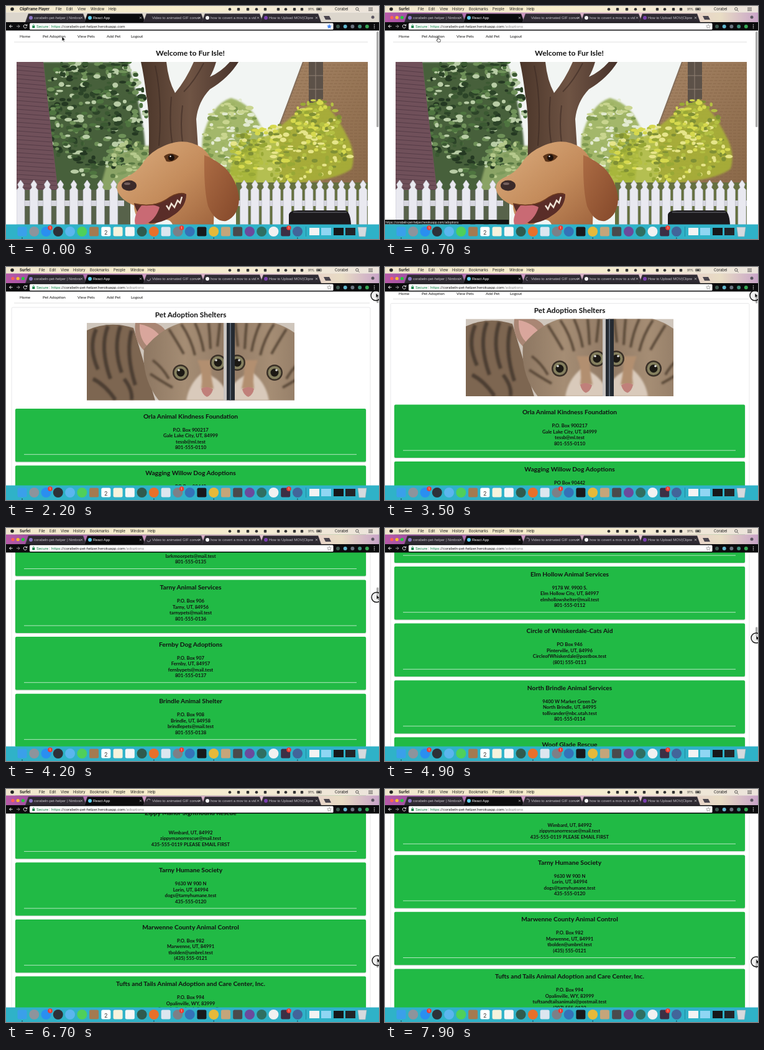
An HTML page that plays this animation: 600x375 px, repeating every 8000 ms.

```html
<!DOCTYPE html>
<html lang="en">
<head>
<meta charset="utf-8">
<title>Pet helper walkthrough</title>
<style>
  html, body { margin: 0; width: 100%; height: 100%; overflow: hidden; background: #fff; }
  svg { display: block; width: 100vw; height: 100vh; }
  text { white-space: pre; }
  .page text { font-family: Lato, "Open Sans", sans-serif; fill: #111; }
  .page .bold { font-weight: 700; text-anchor: middle; }
  .menu { font: 5.8px Inter, Roboto, sans-serif; fill: #1a1a1a; }
  .tab { font: 5.9px "Liberation Sans", Arial, sans-serif; fill: #c9c6cc; }
  .url { font: 6.25px Roboto, sans-serif; fill: #222; }
  .badge { font: 5px Roboto, sans-serif; fill: #fff; text-anchor: middle; }
</style>
</head>
<body>
<svg viewBox="0 0 600 375" preserveAspectRatio="none">
  <defs>
    <clipPath id="dogClip"><path d="M17 90H582V352H17z"/></clipPath>
    <clipPath id="catClip"><path d="M130 90H464V214.500H130z"/></clipPath>
    <linearGradient id="bar">
      <stop offset="0" stop-color="#f0e6cf"/><stop offset=".45" stop-color="#f8eecb"/><stop offset="1" stop-color="#ece4dc"/>
    </linearGradient>
    <linearGradient id="strip">
      <stop offset="0" stop-color="#b75aa8"/><stop offset=".08" stop-color="#9a4fa0"/><stop offset=".4" stop-color="#cf9fc0"/>
      <stop offset=".75" stop-color="#e6c9cf"/><stop offset=".9" stop-color="#e8dcc4"/><stop offset="1" stop-color="#c9a4c8"/>
    </linearGradient>
    <linearGradient id="fur" x1="0" y1="0" x2="1" y2="1">
      <stop offset="0" stop-color="#dcae80"/><stop offset=".55" stop-color="#c48c5c"/><stop offset="1" stop-color="#a0653e"/>
    </linearGradient>
    <linearGradient id="ear" x1="0" y1="0" x2="1" y2="1">
      <stop offset="0" stop-color="#ac6c44"/><stop offset="1" stop-color="#84482a"/>
    </linearGradient>
    <linearGradient id="bark">
      <stop offset="0" stop-color="#4a3529"/><stop offset=".5" stop-color="#6f5444"/><stop offset="1" stop-color="#47322a"/>
    </linearGradient>
    <linearGradient id="brick" x1="0" y1="0" x2="1" y2="1">
      <stop offset="0" stop-color="#a58465"/><stop offset="1" stop-color="#8a6848"/>
    </linearGradient>
    <linearGradient id="tabby">
      <stop offset="0" stop-color="#8d7762"/><stop offset=".5" stop-color="#a58d74"/><stop offset="1" stop-color="#927b66"/>
    </linearGradient>
    <filter id="soft"><feGaussianBlur stdDeviation="1.4"/></filter>
  </defs>

  <rect width="600" height="375" fill="#fff"/>

  <g id="home" class="page">
    <path d="M13 58H582" stroke="#d8d8d8" stroke-width=".8"/>
    <text class="bold" x="296.500" y="80.300" font-size="12.200">Welcome to Fur Isle!</text>
    <g clip-path="url(#dogClip)">
      <rect x="17" y="90" width="565" height="262" fill="#f2f5f3"/>
      <g filter="url(#soft)">
        <path d="M58 90H196L212 150L222 205L230 300H80z" fill="#46603a"/>
        <path d="M170 225H232V300H150z" fill="#8aa365"/>
        <path d="M316 212Q330 158 362 148Q398 158 412 200L400 300H312z" fill="#a3b76a"/>
      </g>
      <g id="leavesBack"></g>
      <path d="M17 90H60L84 300L17 318z" fill="#70505a"/>
      <path id="siding" stroke="#563c47" stroke-width="1.200" fill="none"/>
      <path d="M217 90H258Q261 120 272 140Q290 118 302 90H338Q334 104 328 114Q346 106 360 90H374Q358 116 328 134Q309 154 306 182L311 260H229Q232 178 226 146Q222 112 217 90z" fill="url(#bark)"/>
      <path d="M240 96Q252 150 246 225M266 146Q262 190 268 225M286 138Q304 120 318 92M284 160Q280 190 284 220" stroke="#3d2a23" stroke-width="2" fill="none" opacity=".6"/>
      <path d="M478 90H582V300H440V190z" fill="url(#brick)"/>
      <path id="courses" stroke="#7c5c40" stroke-width="1" stroke-dasharray="5 2" opacity=".55" fill="none"/>
      <path d="M478 90L440 192" stroke="#846e5b" stroke-width="2"/>
      <path d="M487 90H510V150L487 158z" fill="#5c5148"/>
      <path d="M498 90V154M487 112H510M487 134H510" stroke="#8f8072" stroke-width="1"/>
      <path d="M360 262Q372 224 430 204Q470 166 506 150Q530 172 548 208Q564 236 556 262Q520 290 360 290z" fill="#aab634" opacity=".85" filter="url(#soft)"/>
      <g id="leavesFront"></g>
      <path d="M30 296H200V352H30z" fill="#57624a"/>
      <path d="M370 284H582V352H370z" fill="#65703f"/>
      <g id="fence" fill="#e9e9f0"></g>
      <path d="M455 352V336Q456 329 470 329H545Q554 330 555 352z" fill="#1c1a1d"/>
      <path d="M462 332H548" stroke="#55555c" stroke-width="1.500"/>
      <path d="M262 222Q290 212 315 228Q342 250 336 290L334 352H268Q262 336 238 352H222Q206 340 206 321Q184 312 179 297Q176 284 190 277Q212 268 221 251Q234 232 262 222z" fill="url(#fur)"/>
      <path d="M206 318Q236 324 257 312Q280 296 290 303Q290 322 272 335Q252 350 232 350Q214 345 206 318z" fill="#5a2d28"/>
      <path d="M218 321Q238 318 247 324Q240 346 222 352H208Q204 338 218 321z" fill="#c96a74"/>
      <path d="M258 321L262 327L266 318L271 324L276 313L280 317L283 307" stroke="#efe4d6" stroke-width="2.500" fill="none"/>
      <path d="M206 318Q236 325 257 312Q276 298 288 303" stroke="#6d3a1e" stroke-width="1.500" fill="none"/>
      <path d="M319 240Q336 246 354 262Q373 284 375 310Q374 338 354 346Q336 348 325 322Q318 296 319 240z" fill="url(#ear)"/>
      <ellipse cx="198" cy="289" rx="12" ry="8.500" fill="#3b2a2a"/>
      <ellipse cx="195" cy="286" rx="5" ry="2" fill="#75605f"/>
      <path d="M254 242Q264 233 278 242Q270 253 258 250z" fill="#593319"/>
      <circle cx="266" cy="244" r="5" fill="#1d110c"/>
      <circle cx="264.500" cy="242" r="1.200" fill="#eee"/>
    </g>
  </g>

  <g id="shelters" class="page">
    <path d="M13 58H585" stroke="#d8d8d8" stroke-width=".8"/>
    <rect x="9" y="65" width="577" height="4100" rx="2" fill="#fff" stroke="#e2e2e4" stroke-width=".8"/>
    <text class="bold" x="297" y="80.800" font-size="11.800">Pet Adoption Shelters</text>
    <g clip-path="url(#catClip)">
      <rect x="130" y="90" width="334" height="125" fill="#cfc6bc"/>
      <path d="M130 102Q165 86 205 98L240 215H130z" fill="#7d6651"/>
      <path d="M145 100Q132 130 148 165M164 95Q150 130 168 180M184 95Q172 130 186 170M202 102Q192 140 208 190M140 180Q160 190 176 214M190 180Q204 198 202 214" stroke="#4c3d31" stroke-width="6" fill="none" filter="url(#soft)"/>
      <path d="M208 90H240Q258 96 262 116L226 138Q204 120 208 90z" fill="#a98674"/>
      <path d="M215 92Q238 96 250 114L228 128Q214 116 215 92z" fill="#d9a69c"/>
      <g id="face">
        <path d="M222 132Q250 96 290 88H354V215H246Q218 180 222 132z" fill="url(#tabby)"/>
        <path d="M262 100Q276 122 286 140M282 92Q298 116 304 142M304 90Q314 112 318 136M326 90Q328 110 329 132M344 90Q342 110 340 128M236 150Q252 162 262 180M232 172Q250 184 268 194" stroke="#5a4839" stroke-width="4" fill="none" filter="url(#soft)"/>
        <path d="M290 215Q294 188 316 170Q340 176 352 196V215z" fill="#d9cabb" filter="url(#soft)"/>
        <path d="M308 150Q318 172 314 196H334Q328 170 330 150z" fill="#b28f70" filter="url(#soft)"/>
        <path d="M314 196Q323 190 333 197Q330 207 323 209Q316 206 314 196z" fill="#c0807a"/>
        <g id="eyeL">
          <circle cx="281" cy="170" r="13" fill="#3a3027"/>
          <circle cx="281" cy="170" r="10.500" fill="#85805f"/>
          <circle cx="281" cy="170" r="6.500" fill="#1c1914"/>
          <circle cx="278" cy="166" r="1.800" fill="#ddd"/>
        </g>
        <use href="#eyeL" transform="translate(60 -16)"/>
      </g>
      <use href="#face" transform="translate(713 0) scale(-1 1)"/>
      <path d="M354 90H368V215H354z" fill="#252a31"/>
      <path d="M350 90H355V215H350z" fill="#c9c5c2"/>
      <path d="M361 90V215" stroke="#586270" stroke-width="2"/>
    </g>
    <g id="cards"></g>
  </g>

  <rect id="thumb" x="596" width="3.200" rx="1.600" fill="#a8a8a8"/>

  <g id="status">
    <rect y="344" width="199" height="7.500" fill="#111"/>
    <text x="1" y="349.500" style="font:4.950px Roboto,sans-serif" fill="#eee">https://corabeln-pet-helper.herokuapp.com/adoptions</text>
  </g>

  <g id="browser">
    <rect width="600" height="10.500" fill="url(#bar)"/>
    <circle cx="10" cy="5" r="2.800" fill="#222"/>
    <g id="menuPlayer" class="menu"></g>
    <g id="menuBrowser" class="menu"></g>
    <g id="tray" fill="#333"></g>
    <text class="menu" x="486" y="7" style="font-size:5px">91%</text>
    <rect x="499.500" y="3" width="8" height="4" rx=".8" fill="none" stroke="#333" stroke-width=".7"/>
    <rect x="500.500" y="4" width="5.500" height="2" fill="#333"/>
    <text class="menu" x="529" y="7.300">Corabel</text>
    <path d="M566.500 6.500L568.500 8.500M583 3H590M583 5.200H590M583 7.400H590" stroke="#333" stroke-width=".8"/>
    <circle cx="564.800" cy="4.700" r="2.200" fill="none" stroke="#333" stroke-width=".8"/>
    <rect y="10.500" width="600" height="16" fill="#dcd6cc"/>
    <rect id="stripFront" y="10.500" width="600" height="16" fill="url(#strip)"/>
    <g id="tabs"></g>
    <g id="lights"></g>
    <path id="spinner" d="M0 -2.800A2.800 2.800 0 0 1 0 2.800" fill="none" stroke="#8f8b96" stroke-width="1"/>
    <rect y="26" width="600" height="13.500" fill="#0b0b0d"/>
    <path d="M10.500 32.700H5.500L8 30.200M5.500 32.700L8 35.200" stroke="#eee" fill="none"/>
    <path d="M17 32.700H22L19.500 30.200M22 32.700L19.500 35.200" stroke="#999" fill="none"/>
    <path d="M33 31A2.700 2.700 0 1 0 33.500 33.500M33.800 29.500V31.700H31.600" stroke="#eee" fill="none"/>
    <rect x="38" y="27.500" width="488.500" height="10.500" rx="1.500" fill="#fff"/>
    <rect x="42.300" y="32" width="4" height="3.400" fill="#0b8043"/>
    <path d="M43.200 32V31A1.100 1.100 0 0 1 45.400 31V32" stroke="#0b8043" stroke-width=".7" fill="none"/>
    <text class="url" x="49" y="34.900" style="fill:#0b8043">Secure</text>
    <path d="M70 29.500V36" stroke="#ccc" stroke-width=".6"/>
    <text class="url" x="73" y="34.900"><tspan fill="#0b8043">https</tspan>://corabeln-pet-helper.herokuapp.com<tspan id="path" fill="#888">/adoptions</tspan></text>
    <path id="star" d="M520 29.500L521 31.800L523.400 32L521.600 33.600L522.200 36L520 34.700L517.800 36L518.400 33.600L516.600 32L519 31.800z" stroke-width=".6"/>
    <g id="extras"></g>
    <path d="M592.500 29.500V36.500" stroke="#ddd" stroke-width="1.300" stroke-dasharray="1.300"/>
  </g>

  <g id="dock"><rect y="351.500" width="600" height="24" fill="#2fb2c8"/></g>

  <g id="cursor">
    <circle id="press" cx="0" cy="4" r="8" fill="#ddd" fill-opacity=".45" stroke="#111" stroke-width="1.400"/>
    <path id="arrow" d="M0 0V7.500L1.800 5.900L3 8.700L4.200 8.200L3 5.500H5.400z" fill="#111" stroke="#fff" stroke-width=".6"/>
    <path id="hand" d="M-.6 0Q.6 -.8 1.100 .4V3L3.600 3.600Q4.600 4 4.300 5.500L3.600 8H0L-2.400 5Q-2.200 4 -.6 4.800z" fill="#fff" stroke="#111" stroke-width=".7"/>
  </g>
</svg>

<script>
const NS = "http://www.w3.org/2000/svg";
const $ = id => document.getElementById(id);

function add(parent, tag, attrs, text) {
  const el = document.createElementNS(NS, tag);
  for (const k in attrs) el.setAttribute(k, attrs[k]);
  if (text !== undefined) el.textContent = text;
  parent.append(el);
  return el;
}

let seed = 7;
const rnd = () => (seed = seed * 16807 % 2147483647) / 2147483647;

// Foliage: random leaf clumps inside an ellipse
function leaves(parent, n, cx, cy, rx, ry, size, colors) {
  for (let i = 0; i < n; i++) {
    const a = rnd() * 6.283, d = Math.sqrt(rnd());
    add(parent, "ellipse", {
      cx: cx + Math.cos(a) * d * rx, cy: cy + Math.sin(a) * d * ry,
      rx: size * (.5 + rnd()), ry: size * (.35 + rnd() * .6),
      fill: colors[Math.floor(rnd() * colors.length)]
    });
  }
}
const dark = ["#2c4428", "#3b5932", "#4f7540", "#243822", "#6f9159", "#b9cda6"];
const light = ["#b4c043", "#98a836", "#d6d94e", "#7f8f35", "#e6e58a"];
const pale = ["#9fb465", "#7f9a50", "#c9d58f", "#e2ead0"];
leaves($("leavesBack"), 420, 142, 170, 84, 105, 4.5, dark);
leaves($("leavesBack"), 60, 200, 255, 34, 40, 4, ["#7d9a5c", "#b5c98c", "#5b7a44"]);
leaves($("leavesBack"), 170, 364, 220, 48, 72, 4.5, pale);
leaves($("leavesFront"), 240, 455, 235, 100, 46, 4, light);
leaves($("leavesFront"), 90, 500, 182, 38, 32, 4, light);

let boards = "", courses = "";
for (let y = 96; y < 310; y += 7) boards += `M17 ${y}L${60 + (y - 90) * .11} ${y + 4}`;
for (let y = 95; y < 290; y += 5) courses += `M${Math.max(441, 478 - (y - 90) * .38)} ${y}H582`;
$("siding").setAttribute("d", boards);
$("courses").setAttribute("d", courses);

function fence(from, to, step) {
  add($("fence"), "path", { d: `M${from - 10} 313H${to + 10}v9H${from - 10}z`, fill: "#d6d6de" });
  for (let x = from; x <= to; x += step)
    add($("fence"), "path", {
      d: `M${x} 280l5 7l-2 5l3.500 4V352h-13V296l3.500 -4l-2 -5z`, stroke: "#b3b4c0", "stroke-width": .6
    });
}
fence(23.5, 180, 21.4);
fence(383, 580, 17.4);

for (const id of ["home", "shelters"])
  [["Home", 22], ["Pet Adoption", 59], ["View Pets", 115], ["Add Pet", 162], ["Logout", 201]]
    .forEach(([s, x]) => add($(id), "text", { x, y: 51.2, "font-size": 6.4 }, s));

const known = {
  0: ["Orla Animal Kindness Foundation", "P.O. Box 900217", "Gale Lake City, UT, 84999", "tessb@ml.test", "801-555-0110"],
  1: ["Wagging Willow Dog Adoptions", "PO Box 90442", "Gale Lake City, UT, 84998", "wagging@mail.test", "801-555-0111"],
  15: ["Elm Hollow Animal Services", "9178 W. 9900 S.", "Elm Hollow City, UT, 84997", "elmhollowshelter@mail.test", "801-555-0112"],
  16: ["Circle of Whiskerdale-Cats Aid", "PO Box 946", "Pinterville, UT, 84996", "CircleofWhiskerdale@postbox.test", "(801) 555-0113"],
  17: ["North Brindle Animal Services", "9400 W Market Green Dr", "North Brindle, UT, 84995", "tollivander@nbc.utah.test", "801-555-0114"],
  18: ["Woof Glade Rescue", "PO Box 958", "Pinterville, UT, 84996", "woofglade@mail.test", "801-555-0115"],
  28: ["Fernby Pet Adoptions", "PO Box 963", "Lorin, UT, 84994", "1adoptions@pmail.test", "(801) 555-0116"],
  29: ["Odem Hollow Animal Rescue, Inc.", "", "Quillen Fork, UT, 84993", "odemhollowanimalrescue@mail.test", "385-555-0117"],
  30: ["7 Snouts Rescue", "P.O. Box 971", "Wimbard, UT, 84992", "Snoutly42@pml.test", "801-555-0118"],
  31: ["Zippy Manor Sighthound Rescue", "", "Wimbard, UT, 84992", "zippymanorrescue@mail.test", "435-555-0119 PLEASE EMAIL FIRST"],
  32: ["Tarny Humane Society", "9630 W 900 N", "Lorin, UT, 84994", "dogs@tarnyhumane.test", "435-555-0120"],
  33: ["Marwenne County Animal Control", "P.O. Box 982", "Marwenne, UT, 84991", "tbolden@umbrel.test", "(435) 555-0121"],
  34: ["Tufts and Tails Animal Adoption and Care Center, Inc.", "P.O. Box 994", "Opalinville, WY, 83999", "tuftsandtailsanimals@postmail.test", "(307) 555-0122"]
};
const towns = ["Fernby", "Larkmoor", "Quillen", "Brindle", "Tarny", "Wimbard", "Pinter"];
const kinds = ["Animal Shelter", "Cat Rescue", "Animal Services", "Dog Adoptions"];

function cardText(i) {
  if (known[i]) return known[i];
  const town = towns[i * 3 % 7], kind = kinds[i % 4];
  return [`${town} ${kind}`, `P.O. Box ${900 + i}`, `${town}, UT, ${84950 + i}`,
    `${town.toLowerCase()}pets@mail.test`, `801-555-01${30 + i}`];
}

const FIRST = 228, PITCH = 91.6;
for (let i = 0; i < 38; i++) {
  const g = add($("cards"), "g", { transform: `translate(0 ${FIRST + i * PITCH})` });
  add(g, "rect", { x: 14.6, y: .5, width: 564.8, height: 86, rx: 2, fill: "#cfd6d1" });
  add(g, "rect", { x: 15, width: 564, height: 85.5, rx: 2, fill: "#21ba45" });
  add(g, "path", { d: "M29 73.700H564", stroke: "#c4ecce", "stroke-width": .9 });
  cardText(i).forEach((s, k) => add(g, "text", {
    class: "bold", x: 297, y: k ? 27.2 + k * 9.5 : 15.6, "font-size": k ? 7.68 : 10.25
  }, s));
}

function menu(id, items) {
  items.forEach(([s, x], i) =>
    add($(id), "text", { x, y: 7.3, "font-weight": i ? 400 : 700 }, s));
}
menu("menuPlayer", [["ClipFrame Player", 22], ["File", 80], ["Edit", 97], ["View", 115], ["Window", 136], ["Help", 165]]);
menu("menuBrowser", [["Surfel", 22], ["File", 53], ["Edit", 70], ["View", 88], ["History", 108],
  ["Bookmarks", 135], ["People", 173], ["Window", 200], ["Help", 228]]);

[360, 374, 389, 403, 417, 438, 450, 464, 476].forEach((x, i) =>
  i % 3 ? add($("tray"), "rect", { x: x - 2.2, y: 3, width: 4.4, height: 4.4, rx: 1 })
        : add($("tray"), "circle", { cx: x, cy: 5.2, r: 2.3 }));

[["corabeln-pet-helper | Nimbra", 33, "#8a74c4"], ["React App", 128, "#5ccbe8"],
 ["Video to animated GIF conve", 223, ""], ["how to covert a mov to a vid", 317, "#f4f4f4"],
 ["How to Upload MOV(Clipre", 411, "#7b3fb0"]].forEach(([s, x, icon], i) => {
  const tab = $("tabs"), active = i == 1;
  add(tab, "path", {
    d: `M${x - 2} 26.500L${x + 3} 12.500H${x + 91}L${x + 96} 26.500z`,
    fill: active ? "#0b0b0d" : "#2e2a32", stroke: "#55505a", "stroke-width": .5
  });
  if (icon) add(tab, "circle", { cx: x + 7, cy: 19, r: 3, fill: icon });
  const label = add(tab, "text", { class: "tab", x: x + 12, y: 21.2 }, s);
  if (active) label.style.fill = "#fff";
  add(tab, "path", { d: `M${x + 87} 17.500l3 3m0 -3l-3 3`, stroke: "#ddd", "stroke-width": .7 });
});
add($("tabs"), "path", { d: "M511 16h9l3 6h-9z", fill: "#4a454e" });
add($("tabs"), "circle", { cx: 590, cy: 18, r: 2.5, fill: "#5a5560" });
["#ff5f57", "#febc2e", "#28c840"].forEach((fill, i) =>
  add($("lights"), "circle", { cx: 11 + i * 8.2, cy: 18.5, r: 2.6, fill }));

["#3c5a50", "#61b8cf", "#6b7480", "#3f8f7d", "#35a853"].forEach((fill, i) =>
  add($("extras"), "circle", { cx: 534 + i * 11.7, cy: 33, r: 3, fill }));

// Dock: "o" is round, "s" is square
const icons = ("s3aa0ea o8d949c o2a8ff0 o2d3138 o5bb6ee o4fd05a sa47a50 sffffff sf7f3dc sf6f6f6 o2f5b4e oe8702a " +
  "sdce6ef o7c8087 o3472b8 s17191c oe6b93a sc5a57a s4a4a4c o6b4a9c o2f6f62 of1f1f1 s3c2f45 o42659a").split(" ");
const dock = $("dock");
icons.forEach((icon, i) => {
  const x = 26 + i * 19.26, fill = "#" + icon.slice(1);
  if (icon[0] == "o") add(dock, "circle", { cx: x, cy: 363, r: 8, fill });
  else add(dock, "rect", { x: x - 7.5, y: 355.5, width: 15, height: 15, rx: 2.5, fill });
});
add(dock, "text", { x: 160.8, y: 367.5, "font-size": 9, "text-anchor": "middle", "font-family": "Roboto, sans-serif", fill: "#333" }, "2");
add(dock, "path", { d: "M482.500 355V371", stroke: "#237f92", "stroke-width": .8 });
[[496, "#f3f3f3"], [515, "#8fd6f3"], [535, "#16181a"], [554, "#222428"]].forEach(([x, fill]) =>
  add(dock, "rect", { x: x - 8, y: 357, width: 16, height: 12, fill }));
add(dock, "path", { d: "M566 356H580L578 371H568z", fill: "#d5dade", stroke: "#a6b0b6", "stroke-width": .6 });
[71, 282.5, 455].forEach(x => {
  add(dock, "circle", { cx: x, cy: 357, r: 3.8, fill: "#ee3b30" });
  add(dock, "text", { class: "badge", x, y: 358.8 }, "1");
});
[26, 237.9, 334.2, 468.9].forEach(cx => add(dock, "circle", { cx, cy: 373.5, r: .8, fill: "#123" }));

// Each key: [time, value, value...]
function at(keys, t) {
  const n = keys.findIndex(k => k[0] > t);
  if (n < 0) return keys[keys.length - 1].slice(1);
  const a = keys[n - 1], b = keys[n], f = (t - a[0]) / (b[0] - a[0]);
  return a.slice(1).map((v, i) => v + (b[i + 1] - v) * f);
}
const scrollKeys = [[0, 0], [3200, 0], [3500, 6.5], [3700, 90], [4900, 1540], [5800, 2804], [6200, 2980], [6800, 3053]];
const cursorKeys = [[0, 90, 49], [200, 90, 49], [500, 85, 50], [1000, 85, 50], [1500, 420, 52], [1900, 595, 42],
  [3500, 595, 42], [4900, 597, 173], [5800, 597, 255], [6800, 597, 274]];

const show = (id, on) => $(id).style.display = on ? "" : "none";
const move = (id, s) => $(id).setAttribute("transform", s);

function draw(t) {
  const front = t >= 500, visited = t >= 600, second = t >= 900, hand = t >= 500 && t < 1100;
  const [scroll] = at(scrollKeys, t), [x, y] = at(cursorKeys, t);
  show("home", !second);
  show("shelters", second);
  show("menuPlayer", !front);
  show("menuBrowser", front);
  show("stripFront", front);
  show("lights", front);
  show("path", visited);
  show("status", hand);
  show("hand", hand);
  show("arrow", !hand);
  show("press", t >= 2000);
  show("spinner", second);
  $("star").setAttribute("fill", visited ? "#fff" : "#4285f4");
  $("star").setAttribute("stroke", visited ? "#777" : "#4285f4");
  move("shelters", `translate(0 ${-scroll})`);
  move("cursor", `translate(${x} ${y})`);
  move("spinner", `translate(229.500 19) rotate(${t * .36})`);
  $("thumb").setAttribute("y", second ? 43 + scroll * .0755 : 41);
  $("thumb").setAttribute("height", second ? 15 : 154);
}

const start = performance.now();
function tick() {
  const t = (performance.now() - start) % 8000;
  draw(Math.floor(t / 100) * 100);
  requestAnimationFrame(tick);
}
tick();
</script>
</body>
</html>
```
